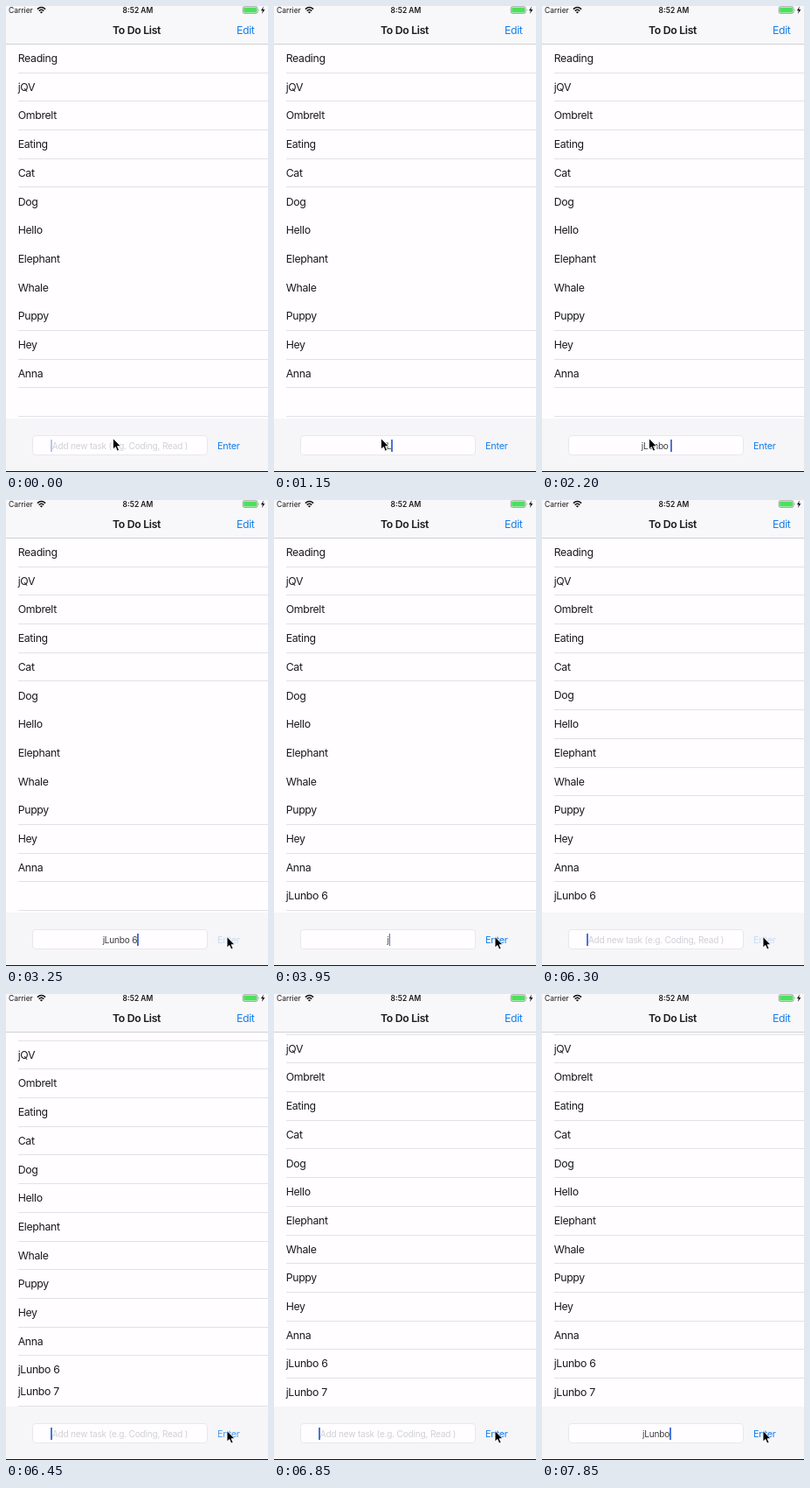
An HTML page that plays this animation: 300x532 px, repeating every 8000 ms.

```html
<!DOCTYPE html>
<html lang="en">
<head>
<meta charset="utf-8">
<title>To Do List</title>
<style>
  html, body { margin: 0; width: 100%; height: 100%; overflow: hidden; background: #fffdff; }
  body {
    position: relative;
    font: 12.3px/1 Inter, Roboto, sans-serif;
    letter-spacing: -.33px;
    color: #1a1a1c;
  }
  #stage { position: absolute; left: 0; top: 0; width: 300px; height: 532px; overflow: hidden; background: #fffdff; }
  #stage > * { position: absolute; }

  #list { inset: 0; }
  .row {
    position: absolute; left: 0; width: 100%; height: 32.7px;
    box-sizing: border-box; padding-left: 13.7px;
    line-height: 32.7px; background: #fffdff;
  }
  .row::after {
    content: ""; position: absolute; left: 14px; right: 0; bottom: 0;
    height: 1px; background: #e2e1e5;
  }
  .row.plain::after { display: none; }

  #nav {
    left: 0; top: 0; width: 300px; height: 43px; z-index: 30;
    background: #f8f7f9; border-bottom: 1px solid #cfcfd2;
  }
  #nav > * { position: absolute; }
  #nav span { white-space: nowrap; }
  .small { font-size: 8.5px; line-height: 10px; top: 0; letter-spacing: 0; }
  #carrier { left: 3px; }
  #clock { left: 0; width: 302px; text-align: center; font-weight: 600; }
  #title { left: 0; width: 299px; top: 18px; line-height: 20px; text-align: center; font-weight: 600; }
  #edit { right: 15.5px; top: 18px; line-height: 20px; }
  .blue { color: #147fec; }

  #bar {
    left: 0; top: 471px; width: 300px; height: 60px; z-index: 30;
    background: #f6f5f8; border-bottom: 1px solid #111;
  }
  #bar > * { position: absolute; }
  #field {
    left: 30px; top: 19px; width: 201px; height: 23px; box-sizing: border-box;
    border: 1px solid #e8e7ea; border-radius: 4px; background: #fffdff;
    display: flex; justify-content: center; align-items: center;
    font-size: 10.1px; letter-spacing: -.21px; white-space: pre;
  }
  #entry { position: relative; line-height: 14px; color: #3c3c40; }
  #entry.empty { color: #d0d0d5; }
  #caret { position: absolute; left: 100%; top: 0; width: 1.5px; height: 14px; background: #4a74da; }
  .empty #caret { left: -1.5px; }
  #enter { left: 242px; top: 21px; line-height: 20px; font-size: 10.87px; letter-spacing: -.25px; }

  #mouse { left: 0; top: 0; z-index: 40; overflow: visible; }
</style>
</head>
<body>
<div id="stage">
  <div id="list"></div>

  <div id="nav">
    <span id="carrier" class="small">Carrier</span>
    <svg style="left:35px;top:0" width="12" height="10" fill="none" stroke="#111" stroke-width="1.5">
      <path d="M.9 3.6Q5.5 -.6 10.1 3.6M2.7 5.6Q5.5 3 8.3 5.6"/>
      <path d="M5.5 8.6L3.9 6.9Q5.5 5.5 7.1 6.9Z" fill="#111" stroke="none"/>
    </svg>
    <span id="clock" class="small">8:52 AM</span>
    <svg style="left:270px;top:0" width="30" height="10">
      <rect x="1.3" y=".8" width="16.6" height="7.6" rx="1.6" fill="#fff" stroke="#777" stroke-width=".7"/>
      <rect x="2.2" y="1.7" width="14.8" height="5.8" rx=".8" fill="#4be05c"/>
      <path d="M18.9 3.2Q20.3 4.6 18.9 6Z" fill="#777"/>
      <path d="M25 .6L21.9 5.2H23.9L23 9L26.4 4H24.2Z" fill="#111"/>
    </svg>
    <span id="title">To Do List</span>
    <span id="edit" class="blue">Edit</span>
  </div>

  <div id="bar">
    <div id="field"><span id="entry"><span id="text"></span><i id="caret"></i></span></div>
    <span id="enter" class="blue">Enter</span>
  </div>

  <svg id="mouse" width="12" height="18">
    <path d="M0 0V12.6L2.9 10L4.8 14.6L7.1 13.6L5.1 9.2H9Z" fill="#000" stroke="#fff" stroke-width=".9" stroke-linejoin="round"/>
  </svg>
</div>

<script>
const LOOP = 8000, TOP = 44, ROW = 32.7, SCROLL = 30, SLIDE = 220;
const WORD = 'jLunbo', HINT = 'Add new task (e.g. Coding, Read )';
const names = ['Reading', 'jQV', 'Ombrelt', 'Eating', 'Cat', 'Dog', 'Hello', 'Elephant',
  'Whale', 'Puppy', 'Hey', 'Anna', WORD + ' 6', WORD + ' 7'];

// [time, number of letters shown, last character of the task]
const typing = [
  [0, 0], [950, 1], [1150, 2], [1350, 3], [1550, 4], [1700, 5], [1900, 6], [2100, 7], [2350, 8, '6'],
  [3300, 0], [3900, 1], [4100, 2], [4250, 3], [4400, 4], [4450, 5], [4600, 6],
  [4800, 5], [4900, 4], [5000, 3], [5150, 2],
  [5350, 3], [5450, 4], [5500, 5], [5550, 6], [5850, 7], [6000, 8, '7'],
  [6300, 0], [6900, 1], [7100, 2], [7300, 3], [7450, 4], [7650, 5], [7800, 6]
];
const presses = [[3200, 3300], [6250, 6300]];

const $ = id => document.getElementById(id);
const ramp = (t, from, to) => Math.min(1, Math.max(0, (t - from) / (to - from)));
const ease = x => x * x * (3 - 2 * x);
const mix = (a, b, p) => a + (b - a) * p;

const rows = names.map((name, i) => {
  const el = document.createElement('div');
  el.className = 'row';
  el.style.zIndex = 20 - i;
  $('list').append(el);
  return el;
});

function drawRows(t) {
  const added = presses.map(([, up]) => ease(ramp(t, up, up + SLIDE)));
  const scroll = SCROLL * added[1];
  rows.forEach((el, i) => {
    const release = i < 12 ? -1 : presses[i - 12][1];
    const shown = t >= release;
    // a new row slides out from behind the one above it
    const lag = i >= 12 && shown ? 1 - added[i - 12] : 0;
    el.textContent = shown ? names[i] : '';
    el.style.top = TOP + ROW * (i - lag) - scroll + 'px';
    const hidden = i > 4 && i < 9 && !scroll;
    const covered = i === 12 && scroll > 0 && added[1] < 1;
    el.classList.toggle('plain', hidden || covered);
  });
}

function caretAlpha(t) {
  if (t < 250) return .4 * (1 - ramp(t, 0, 100));
  if (t < 700) return ramp(t, 250, 400);
  return t < 950 ? 1 - ramp(t, 750, 900) : 1;
}

function drawField(t) {
  const [, count, digit = ''] = typing.findLast(step => step[0] <= t);
  $('text').textContent = count ? (WORD + ' ' + digit).slice(0, count) : HINT;
  $('entry').className = count ? '' : 'empty';
  $('caret').style.opacity = caretAlpha(t);
}

function drawButton(t) {
  let alpha = 1;
  for (const [down, up] of presses) {
    if (t >= down) alpha = t < up ? .2 : mix(.2, 1, ramp(t, up, up + 220));
  }
  $('enter').style.opacity = alpha;
}

function drawMouse(t) {
  const p = ease(ramp(t, 2750, 3150));
  $('mouse').style.transform = `translate(${mix(122.5, 253, p)}px, ${mix(493.5, 498.5, p)}px)`;
}

function frame() {
  const t = performance.now() % LOOP;
  drawRows(t);
  drawField(t);
  drawButton(t);
  drawMouse(t);
  requestAnimationFrame(frame);
}
frame();
</script>
</body>
</html>
```
